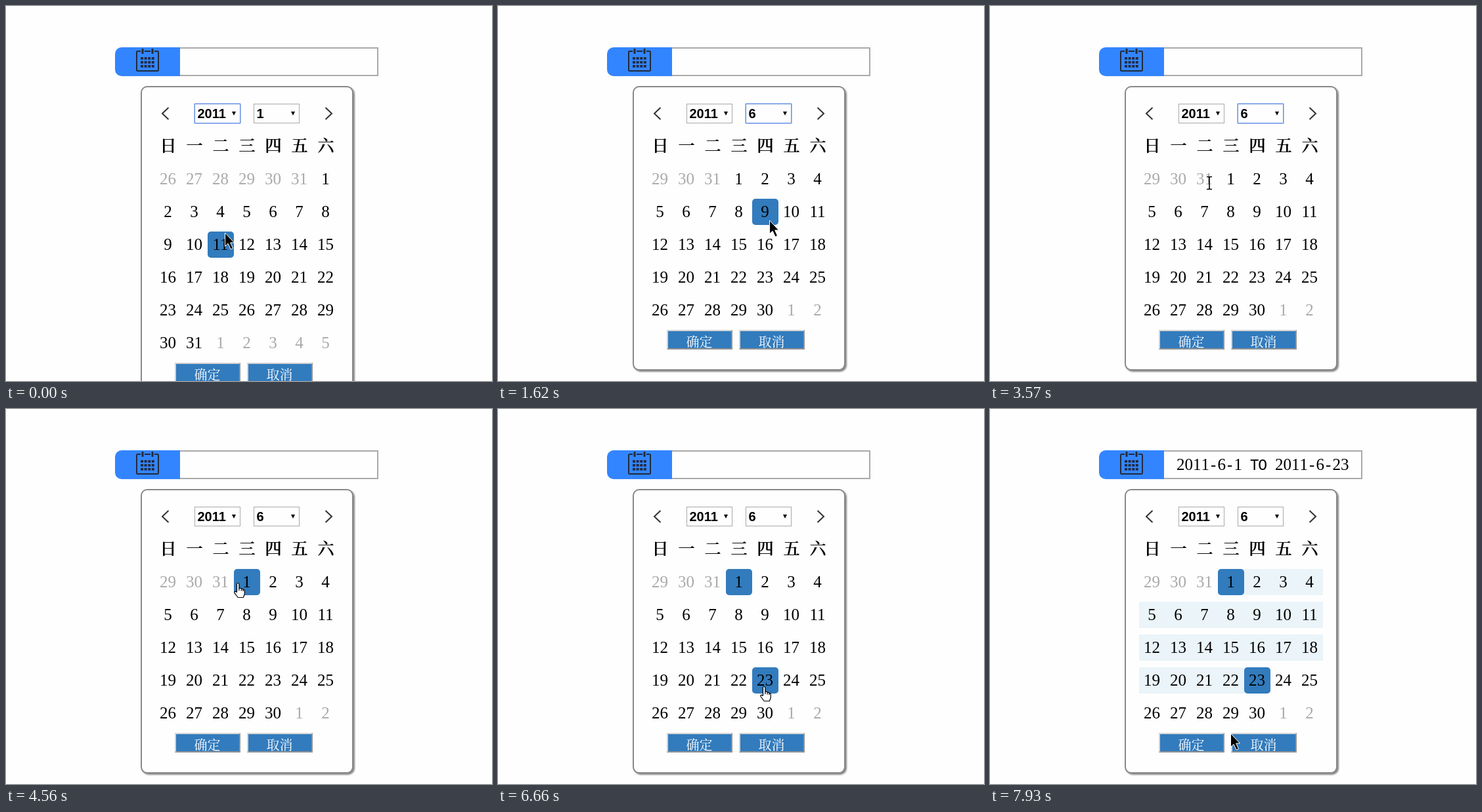
Animation, 740 px wide and 572 px high, one loop 8 s. Source, as an HTML page:

```html
<!DOCTYPE html>
<html lang="zh-CN">
<head>
<meta charset="utf-8">
<style>
html, body { margin: 0; width: 100%; height: 100%; overflow: hidden; background: #fefefe; }
svg { display: block; width: 100%; height: 100%; font-kerning: none; }
.num { font: 25px "Liberation Serif", serif; text-anchor: middle; }
.mono { font: 23px "Liberation Mono", monospace; text-anchor: middle; }
.week { font: 25px "Noto Serif CJK SC", "Noto Sans CJK SC", "Noto Sans CJK", serif; text-anchor: middle; text-shadow: 1px 0 #000; }
.btn { font: 300 20px "Noto Serif CJK SC", "Noto Sans CJK SC", "Noto Sans CJK", serif; text-anchor: middle; }
.pick { font: bold 20px "Liberation Sans", Arial, sans-serif; }
.item { font: 20px "Liberation Sans", Arial, sans-serif; }
</style>
</head>
<body>
<svg id="stage" viewBox="0 0 740 572"></svg>
<script>
const LOOP = 8000, YEAR = 2011, BLUE = '#327bbd';
const OPEN = 930, CHOSEN = 1620, START = 4560, END = 6940;
const stage = document.getElementById('stage');

// time, pointer x, y, shape, hovered day (or list item while the list is open)
const steps = [
  [0, 333, 345, 'arrow', 11], [140, 352, 308, 'arrow', 5], [260, 378, 252, 'arrow'],
  [380, 394, 204, 'arrow'], [500, 402, 168, 'arrow'], [650, 410, 163, 'arrow'],
  [930, 410, 163, 'arrow', 1], [1080, 411, 242, 'arrow', 3], [1230, 412, 286, 'arrow', 5],
  [1350, 413, 326, 'arrow', 6], [1620, 413, 326, 'arrow', 9], [2310, 413, 326, 'hand', 9],
  [2460, 469, 327, 'hand', 11], [2620, 509, 336, 'arrow'], [2770, 519, 362, 'arrow'],
  [2910, 492, 350, 'arrow', 18], [3030, 440, 324, 'arrow', 10], [3150, 367, 303, 'arrow', 8],
  [3300, 348, 286, 'arrow'], [3430, 336, 263, 'beam'], [3570, 334, 259, 'beam'],
  [4000, 356, 265, 'hand', 1], [4280, 351, 265, 'hand', 1], [5430, 384, 315, 'arrow', 8],
  [5580, 400, 360, 'arrow', 16], [5700, 413, 398, 'arrow'], [5820, 413, 421, 'hand', 23],
  [5970, 414, 428, 'arrow', 23], [6120, 413, 438, 'arrow'], [6240, 411, 456, 'arrow', 30],
  [6390, 406, 437, 'arrow'], [6520, 403, 422, 'arrow', 23], [6660, 403, 423, 'hand', 23],
  [7810, 394, 460, 'arrow', 30], [7930, 366, 494, 'arrow']
];

const pointers = {
  arrow: '<path transform="translate(.5 1)" d="M0 0V20.5L4.6 16.3L8.6 25L12 23.5L8.2 15H14Z" stroke="#fff"/>',
  hand: `<path transform="translate(-4)" fill="#fff" stroke="#000" stroke-width="1.2"
    d="M4.5 14V2.2a1.7 1.7 0 0 1 3.4 0V8.5q3-1 3.4 1q2.4-.6 2.7 1q2.3-.3 2.3 2V17q-.8 3-2 5.5H6.2L1 15.5q-.6-2.4 1.2-2.4q1.4 .2 2.3 2M7.9 8.5V12M11.3 9.5V12.5M14 10.5V13"/>`,
  beam: '<path d="M-4 1.5H-1L0 2.5L1 1.5H4M0 2V20M-4 20.5H-1L0 19.5L1 20.5H4" fill="none" stroke="#000" stroke-width="1.6"/>'
};

const box = (x, y, w, h, fill, more = '') =>
  `<rect x="${x}" y="${y}" width="${w}" height="${h}" fill="${fill}" ${more}/>`;
const text = (cls, x, y, s, fill = '#000') =>
  `<text class="${cls}" x="${x}" y="${y}" fill="${fill}">${s}</text>`;
const line = (d, color, width) =>
  `<path d="${d}" fill="none" stroke="${color}" stroke-width="${width}"/>`;

function field(value) {
  let s = box(265, 63, 302, 44, '#a9a9a9') + box(265, 65, 300, 40, '#fefefe') +
    '<path d="M265 63H176a10 10 0 0 0-10 10V97a10 10 0 0 0 10 10H265Z" fill="#3385ff"/>' +
    box(199, 69, 33, 30, 'none', 'rx="1.5" stroke="#222b3c" stroke-width="2"');
  for (const x of [208, 223]) {
    s += box(x - 3, 67, 6, 4, '#3385ff') + box(x - 1.5, 65, 3, 8, '#222b3c', 'rx="1"');
  }
  for (let i = 0; i < 12; i++) {
    s += box(205 + i % 4 * 5.6, 78 + (i >> 2) * 6, 4, 3.8, '#222b3c', 'rx=".6"');
  }
  [...value].forEach((c, i) => {
    s += text(/\d/.test(c) ? 'num' : 'mono', 290.2 + 12.5 * i, 93, c);
  });
  return s;
}

function picker(x, value, focus, hover) {
  const edge = focus ? '#6b93e0' : hover ? '#999' : '#a9a9a9';
  return (focus ? box(x - .5, 148.5, 71, 31, 'none', 'rx="1" stroke="#a9c3f5"') : '') +
    box(x + .5, 149.5, 69, 29, '#fefefe', `stroke="${edge}"`) +
    text('pick', x + 4.5, 171, value) +
    `<path d="M${x + 57} 161H${x + 63}L${x + 60} 167Z"/>`;
}

function button(x, y, label) {
  return box(x, y, 100, 30, '#939393') +
    `<path d="M${x} ${y + 30}V${y}H${x + 100}l-2 2H${x + 2}V${y + 28}Z" fill="#d4d4d4"/>` +
    box(x + 2, y + 2, 96, 26, BLUE) + text('btn', x + 49.5, y + 26, label, '#fff');
}

function days(month, hover, from, to) {
  const lead = new Date(YEAR, month - 1, 1).getDay();
  const count = new Date(YEAR, month, 0).getDate();
  const rows = Math.ceil((lead + count) / 7);
  let s = '';
  for (let i = 0; i < rows * 7; i++) {
    const x = 227 + i % 7 * 40, y = 244 + Math.floor(i / 7) * 50;
    const n = i - lead + 1, inside = n > 0 && n <= count;
    if (inside && (n === hover || n === from || n === to)) {
      s += box(x, y, 40, 40, BLUE, 'rx="5"');
    } else if (n > from && n < to) {
      s += box(x, y, 40, 40, '#eaf4f9');
    }
    const date = new Date(YEAR, month - 1, n).getDate();
    s += text('num', x + 19.5, y + 28, date, inside ? '#000' : '#aaa');
  }
  return { s, bottom: 244 + rows * 50 };
}

function list(active) {
  let s = box(377.5, 179.5, 69, 301, '#fefefe', 'stroke="#6b93d8"');
  for (let n = 1; n <= 12; n++) {
    const y = 155 + 25 * n;
    if (n === active) s += box(378, y, 68, 25, '#1e90ff');
    s += text('item', 382.5, y + 18, n, n === active ? '#fff' : '#000');
  }
  return s;
}

function draw([t, x, y, shape, hover]) {
  const open = t >= OPEN && t < CHOSEN;
  const month = t < CHOSEN ? 1 : 6;
  const from = t >= START ? 1 : 0, to = t >= END ? 23 : 0;
  const grid = days(month, open ? 0 : hover, from, to);
  const tall = grid.bottom - 62;
  const frame = 'rx="9" stroke="#888" stroke-width="2"';
  stage.innerHTML =
    '<filter id="soft"><feGaussianBlur stdDeviation="1"/></filter>' +
    field(to ? `${YEAR}-6-${from} TO ${YEAR}-6-${to}` : '') +
    box(207, 124, 324, tall + 2, '#888', 'rx="10" filter="url(#soft)"') +
    box(206, 123, 322, tall, '#fefefe', frame) +
    line('M247.5 155L238 164L247.5 173M486.5 155L496 164L486.5 173', '#333', 2) +
    picker(287, YEAR, t < OPEN) +
    picker(377, month, t >= OPEN && t < START, t >= 500 && t < OPEN) +
    [...'日一二三四五六'].map((c, i) => text('week', 246.5 + 40 * i, 221.5, c)).join('') +
    grid.s + button(257, grid.bottom, '确定') + button(367, grid.bottom, '取消') +
    (open ? list(hover) : '') +
    `<g transform="translate(${x} ${y})">${pointers[shape]}</g>`;
}

let shown;
function tick() {
  const t = performance.now() % LOOP;
  let step = steps[0];
  for (const s of steps) if (s[0] <= t) step = s;
  // clicks change the state without moving the pointer
  const time = [START, END].reduce((a, c) => t >= c ? Math.max(a, c) : a, step[0]);
  if (time !== shown) {
    shown = time;
    draw([time, ...step.slice(1)]);
  }
  requestAnimationFrame(tick);
}
tick();
</script>
</body>
</html>
```
